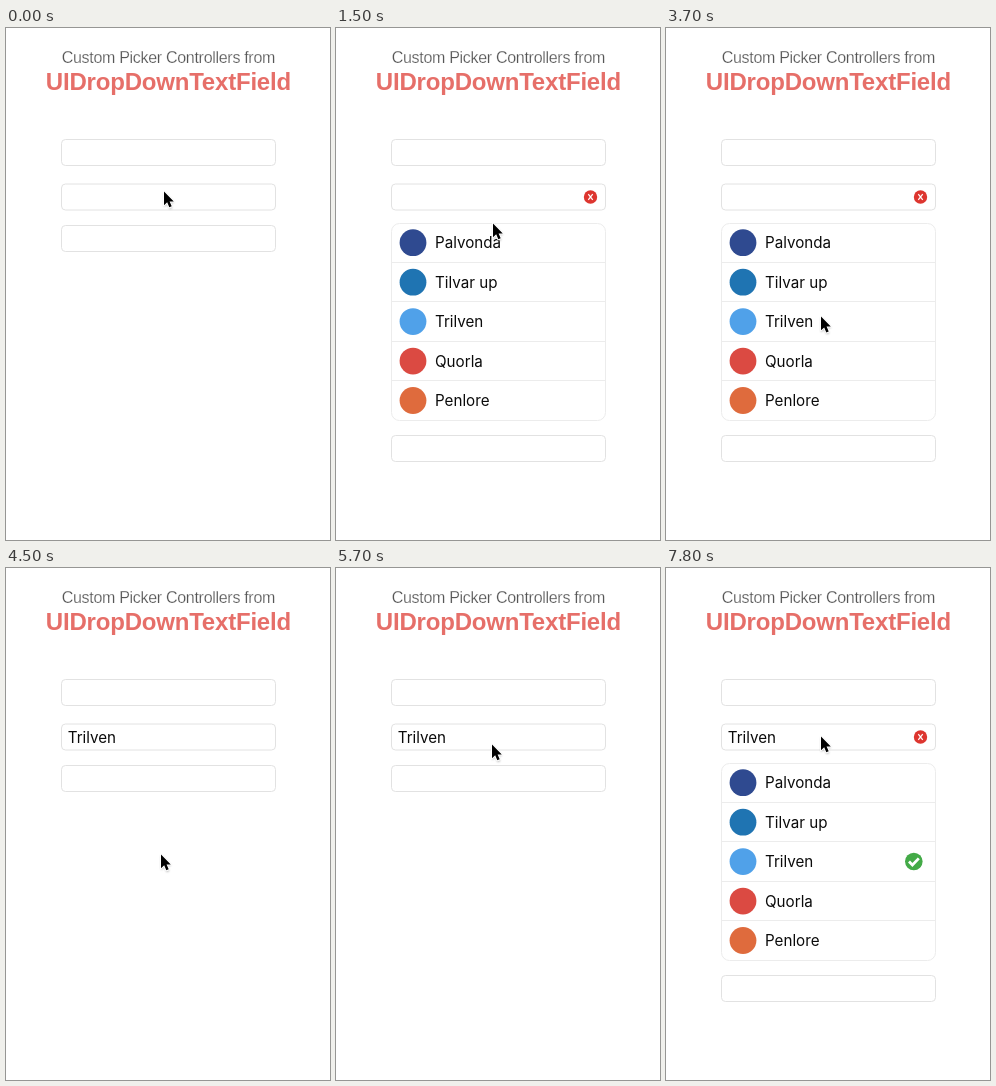
Recreate the animation shown at these times as an HTML page. Size 324x512 px, loop 8 s.

```html
<!DOCTYPE html>
<html lang="en">
<head>
<meta charset="utf-8">
<title>Drop-down text field</title>
<style>
  html, body { margin: 0; width: 100%; height: 100%; overflow: hidden; background: #fff; }
  svg { display: block; width: 100vw; height: 100vh; }
  .heading { font-family: "Liberation Sans", Arial, sans-serif; text-anchor: middle; }
  .intro { font-size: 16px; letter-spacing: -.3px; fill: #555; stroke: #fff; stroke-width: .25px; }
  .name { font-size: 24px; font-weight: 700; letter-spacing: -.2px; fill: #e66f69; }
  .label { font: 15.2px Inter, Roboto, sans-serif; fill: #0b0b0b; }
  .field, .frame { fill: #fff; stroke: #e2e2e2; }
  .frame { stroke: #ececec; }
  .line { stroke: #ececec; }
</style>
</head>
<body>
<svg viewBox="0 0 324 512" xmlns="http://www.w3.org/2000/svg">
  <defs>
    <clipPath id="listClip"><rect id="listWindow" x="54" y="194" width="217" height="199"/></clipPath>
    <filter id="soft" x="-50%" y="-50%" width="200%" height="200%"><feGaussianBlur stdDeviation="1"/></filter>
  </defs>
  <text class="heading intro" x="162.4" y="35.2">Custom Picker Controllers from</text>
  <text class="heading name" x="162.4" y="61.6">UIDropDownTextField</text>

  <rect class="field" x="55.5" y="111.5" width="214" height="26" rx="4"/>
  <rect class="field" x="55.5" y="156" width="214" height="26" rx="4"/>
  <rect class="field" id="lastField" x="55.5" y="197.5" width="214" height="26" rx="4"/>
  <text class="label" id="choice" x="61.7" y="174.6"></text>
  <g id="clear">
    <circle cx="254.5" cy="169" r="6.7" fill="#dd352f"/>
    <path d="M252.3 166.1l4.4 5.8m0-5.8l-4.4 5.8" stroke="#fff" stroke-width="1.2"/>
  </g>

  <g id="list" clip-path="url(#listClip)">
    <rect class="frame" id="listFrame" x="55.5" y="195.5" width="214" height="197" rx="8"/>
    <g id="rows"></g>
    <g id="check">
      <circle cx="247.8" cy="293.5" r="8.8" fill="#43aa47"/>
      <path d="M243 293.6l3.4 3.4 6.4-6.6" fill="none" stroke="#fff" stroke-width="2.8"/>
    </g>
  </g>

  <g id="cursor">
    <path d="M1 2V17L4.4 13.8L6.7 19L9.2 18L7 12.8H11.4Z" fill="#000" opacity=".35" filter="url(#soft)"/>
    <path d="M1 1.4V15.2L4.2 12.3L6.3 17.3L8.7 16.3L6.6 11.4H10.8Z" fill="#000" stroke="#fff" stroke-width="2" stroke-linejoin="round" paint-order="stroke"/>
  </g>
</svg>
<script>
const LOOP = 8000, TICK = 100;
const ROW_HEIGHT = 39.45, LIST_HEIGHT = 197;
const items = [
  ["Palvonda", "#2f4a90"],
  ["Tilvar up", "#1f74b2"],
  ["Trilven", "#50a1e9"],
  ["Quorla", "#db4a42"],
  ["Penlore", "#df6b3d"]
];
const SELECT_AT = 3900;

// Pointer tip positions: time, x, y
const pointerPath = [
  [1200, 157, 162], [1500, 156, 194], [1800, 156, 246], [2100, 154.5, 284],
  [2400, 154, 287.5], [4400, 154, 287], [4500, 154, 285], [4900, 162, 250],
  [5300, 168, 208], [5700, 155, 175], [6100, 154, 167]
];

const $ = id => document.getElementById(id);
const set = (id, name, value) => $(id).setAttribute(name, value);
const show = (id, visible) => set(id, "visibility", visible ? "visible" : "hidden");

$("rows").innerHTML = items.map(([name, color], i) => {
  const y = 214.7 + i * ROW_HEIGHT;
  const line = i ? `<path class="line" d="M56 ${Math.floor(y - ROW_HEIGHT / 2) + .5}H269"/>` : "";
  return `${line}<circle cx="77" cy="${y}" r="13.4" fill="${color}"/>` +
    `<text class="label" x="99" y="${y + 5.5}">${name}</text>`;
}).join("");
$("choice").textContent = items[2][0];

function pointerAt(t) {
  const next = pointerPath.findIndex(p => p[0] > t);
  if (next === 0) return pointerPath[0].slice(1);
  if (next < 0) return pointerPath.at(-1).slice(1);
  const a = pointerPath[next - 1], b = pointerPath[next];
  const k = (t - a[0]) / (b[0] - a[0]);
  return [1, 2].map(i => a[i] + (b[i] - a[i]) * k);
}

function openness(t) {
  if (t < 600) return 0;
  if (t < 700) return .6;
  if (t < SELECT_AT) return 1;
  if (t < 4000) return .4;
  if (t < 6600) return 0;
  return t < 6700 ? .6 : 1;
}

function draw(time) {
  const t = Math.floor(time % LOOP / TICK) * TICK;
  const open = openness(t);
  const selected = t >= SELECT_AT;
  const height = LIST_HEIGHT * open;
  set("listWindow", "height", height + 2);
  set("listFrame", "height", height);
  set("lastField", "y", 197.5 + 210 * open);
  show("list", open > 0);
  show("check", open > 0 && selected);
  show("clear", open > 0);
  show("choice", selected);
  set("cursor", "transform", `translate(${pointerAt(t)})`);
}

const start = performance.now();
function loop() {
  draw(performance.now() - start);
  requestAnimationFrame(loop);
}
loop();
</script>
</body>
</html>
```
